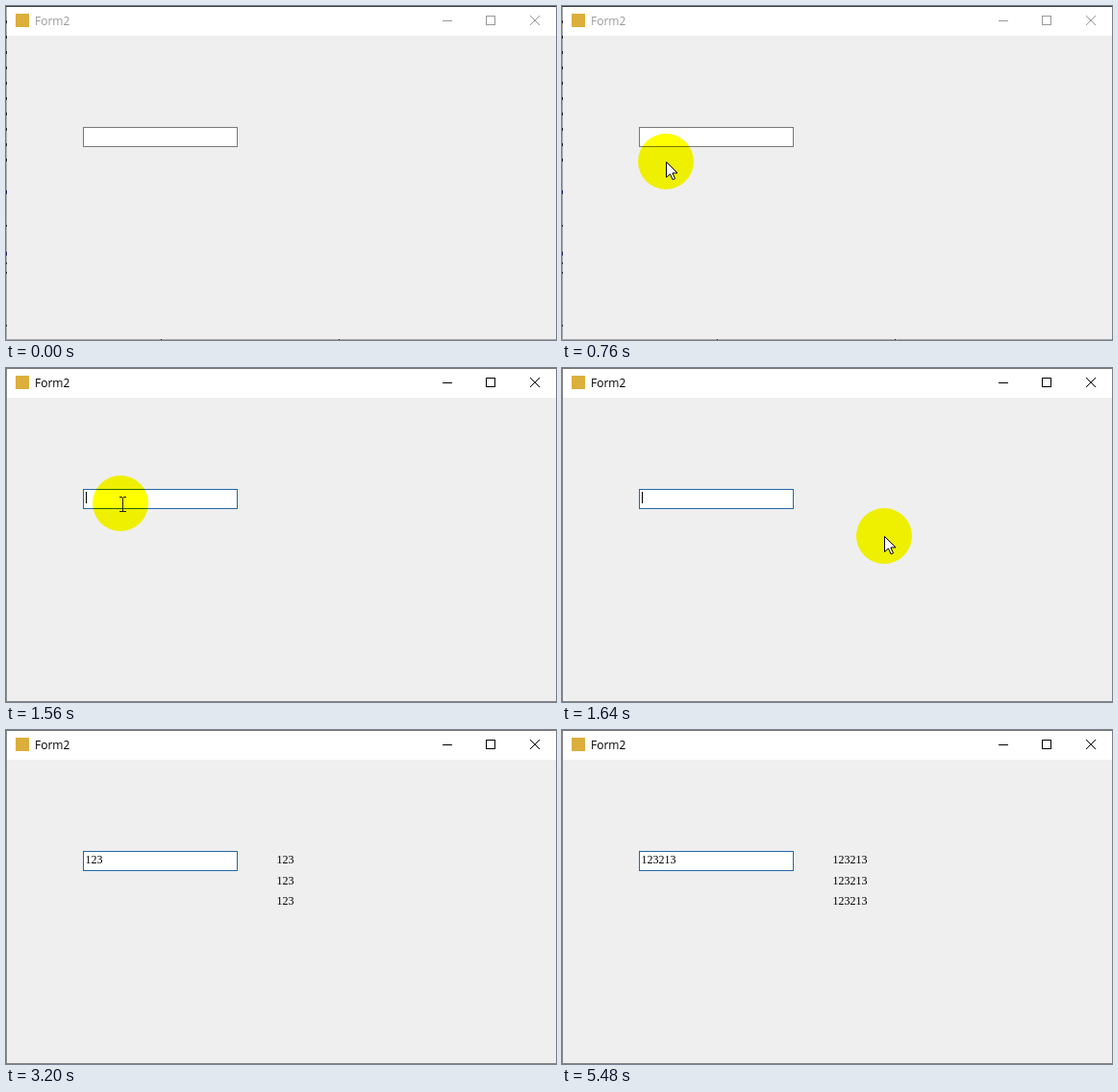
An HTML page with a canvas that plays this animation: 572 px wide and 348 px high, repeating every 5.68 s.

```html
<!DOCTYPE html>
<html lang="en">
<head>
<meta charset="utf-8">
<title>Form</title>
<style>
  html, body { margin: 0; width: 100%; height: 100%; overflow: hidden; background: #efefef; }
  canvas { display: block; }
</style>
</head>
<body>
<canvas id="stage" width="572" height="348"></canvas>
<script>
const ctx = document.getElementById('stage').getContext('2d');
const LOOP = 5680, STEP = 40;
const FOCUS = 1560, ENTER = 640, LEAVE = 1720;
const TEXT = '123213';
const KEYS = [2280, 2400, 2680, 3280, 3480, 3880];
const CARET_OFF = [[2120, 2280], [3200, 3280], [4400, 4960], [5480, LOOP]];

// Pointer path: time, x, y
const PATH = [
  [640, 380, 304], [680, 380, 208], [720, 218, 162], [760, 108, 162],
  [880, 109, 156], [1040, 116, 149], [1200, 119, 144], [1320, 119, 141],
  [1560, 119, 141], [1600, 136, 141], [1640, 335, 175], [1680, 558, 215]
];

const fill = (color, x, y, w, h) => {
  ctx.fillStyle = color;
  ctx.fillRect(x, y, w, h);
};

function frame(color, x, y, w, h) {
  ctx.strokeStyle = color;
  ctx.lineWidth = 1;
  ctx.strokeRect(x + .5, y + .5, w - 1, h - 1);
}

function write(text, x, y, font, color) {
  ctx.font = font;
  ctx.fillStyle = color;
  ctx.fillText(text, x, y);
}

function pointerAt(t) {
  if (t < ENTER || t >= LEAVE) return null;
  let i = 0;
  while (i < PATH.length - 2 && t >= PATH[i + 1][0]) i++;
  const [t0, x0, y0] = PATH[i], [t1, x1, y1] = PATH[i + 1];
  const k = Math.min(1, (t - t0) / (t1 - t0));
  return { x: Math.round(x0 + (x1 - x0) * k), y: Math.round(y0 + (y1 - y0) * k) };
}

const overBox = p => p && p.x >= 80 && p.x < 241 && p.y >= 126 && p.y < 147;

function drawWindow(active) {
  const ink = active ? '#000' : '#999';
  fill('#efefef', 0, 0, 572, 348);
  fill('#fff', 1, 1, 571, 30);

  const edge = active ? '#858585' : '#a8a8a8';
  fill(active ? '#777' : '#3c3c3c', 0, 0, 572, 1);
  fill(edge, 0, 1, 1, 347);
  fill(edge, 0, 347, 572, 1);
  if (!active) drawBackdrop();

  fill('#dcae3c', 10, 8, 14, 14);
  write('Form2', 30, 20, '12px "Open Sans", "Noto Sans", sans-serif', ink);

  fill(ink, 454, 15, 10, 1);
  frame(ink, 499, 10, 10, 10);
  ctx.strokeStyle = ink;
  ctx.beginPath();
  ctx.moveTo(545, 10);
  ctx.lineTo(555, 20);
  ctx.moveTo(555, 10);
  ctx.lineTo(545, 20);
  ctx.stroke();
}

// Specks of the desktop visible through the inactive border
function drawBackdrop() {
  for (let i = 1; i <= 10; i++) fill('#222', 0, i * 16 - 1, 1, 3);
  for (const y of [228, 267, 277, 332]) fill('#333', 0, y, 1, 2);
  for (const y of [192, 256]) fill('#22226a', 0, y, 1, 4);
  for (const x of [161, 346]) fill('#222', x, 347, 1, 1);
}

function drawFields(t, active, hover) {
  fill('#fff', 80, 126, 161, 21);
  frame(active ? '#2168a6' : hover ? '#262626' : '#7a7a7a', 80, 126, 161, 21);

  const typed = KEYS.filter(k => t >= k).length;
  const text = TEXT.slice(0, typed);
  const font = '12px "Liberation Serif", "Noto Serif", serif';
  write(text, 82.5, 139, font, '#000');
  for (const y of [139, 161, 182]) write(text, 281.5, y, font, '#000');

  const blink = CARET_OFF.some(([a, b]) => t >= a && t < b);
  if (active && !blink) fill('#000', 83 + typed * 6, 129, 1, 12);
}

function drawArrow(x, y) {
  const shape = [[0, 0], [0, 16], [4, 12.5], [6.6, 18.4], [9, 17.4], [6.4, 11.5], [11.5, 11.5]];
  ctx.beginPath();
  for (const [dx, dy] of shape) ctx.lineTo(x + .5 + dx, y + .5 + dy);
  ctx.closePath();
  ctx.fillStyle = '#fff';
  ctx.fill();
  ctx.strokeStyle = '#000';
  ctx.stroke();
}

function drawBeam(x, y) {
  fill('#222', x, y - 7, 1, 15);
  for (const dy of [-8, 7]) {
    fill('#222', x - 3, y + dy, 3, 1);
    fill('#222', x + 1, y + dy, 3, 1);
  }
}

function drawPointer(p, beam) {
  ctx.globalCompositeOperation = 'multiply';
  ctx.fillStyle = '#ff0';
  ctx.beginPath();
  ctx.arc(p.x, p.y, 29, 0, Math.PI * 2);
  ctx.fill();
  ctx.globalCompositeOperation = 'source-over';
  if (beam) drawBeam(p.x + 2, p.y + 1);
  else drawArrow(p.x, p.y);
}

function draw(t) {
  const active = t >= FOCUS;
  const p = pointerAt(t);
  const hover = overBox(p);
  drawWindow(active);
  drawFields(t, active, hover);
  if (p) drawPointer(p, hover);
}

const start = performance.now();
function tick() {
  const t = (performance.now() - start) % LOOP;
  draw(Math.floor(t / STEP) * STEP);
  requestAnimationFrame(tick);
}
tick();
</script>
</body>
</html>
```
